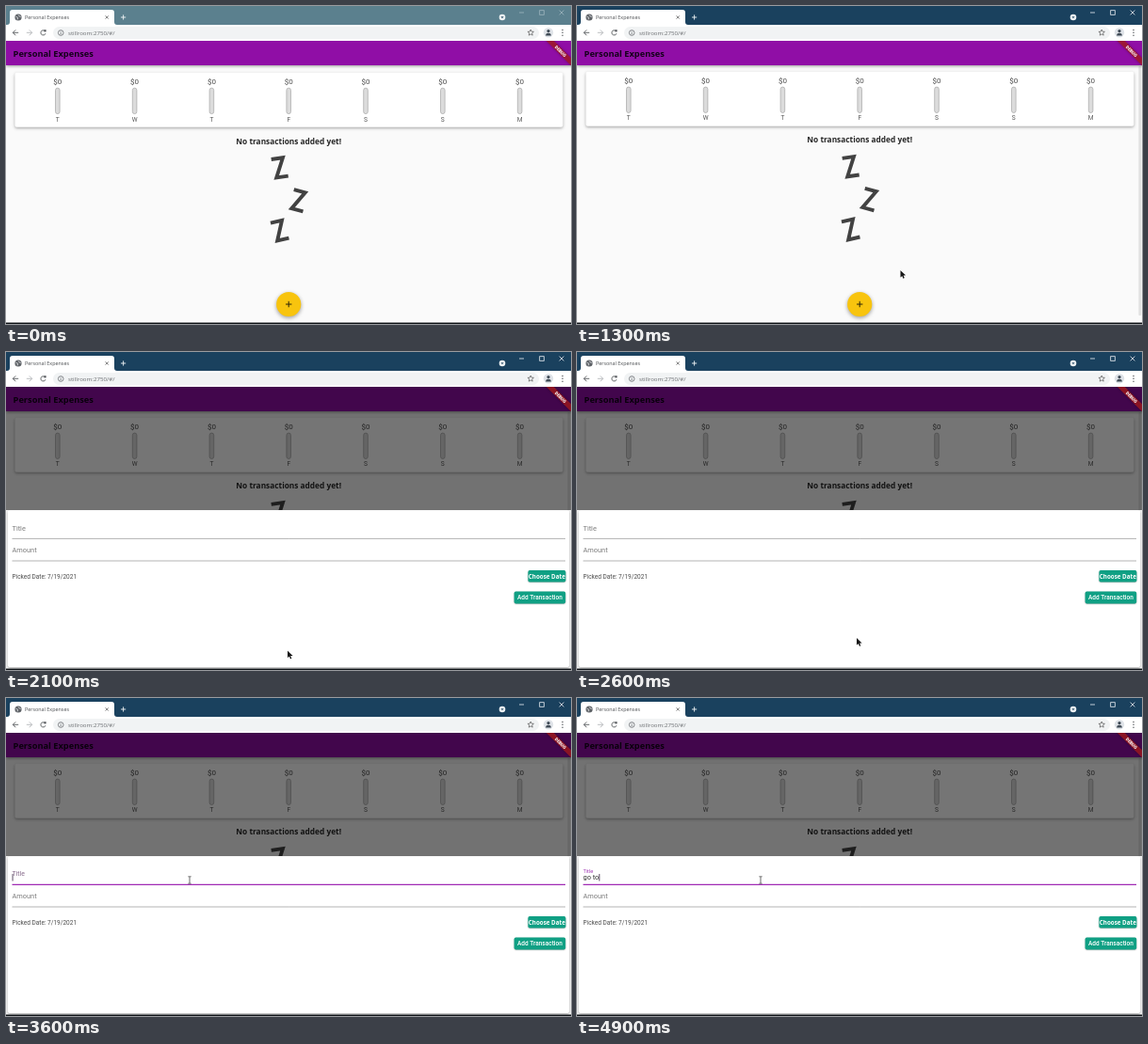
An HTML page with a canvas that plays this animation: 600 px wide and 338 px high, repeating every 5000 ms.

```html
<!DOCTYPE html>
<html lang="en">
<head>
<meta charset="utf-8">
<title>Personal Expenses</title>
<style>
html, body { margin: 0; width: 100%; height: 100%; overflow: hidden; background: #fafafa; }
canvas { display: block; width: 600px; height: 338px; }
</style>
</head>
<body>
<canvas id="stage"></canvas>
<script>
const W = 600, H = 338, LOOP = 5000, STEP = 100;
const OPEN = '"Open Sans", "Noto Sans", sans-serif';
const ROBOTO = 'Roboto, Arial, sans-serif';
const PURPLE = '#900ea6', TEAL = '#10a084';

const canvas = document.getElementById('stage');
const c = canvas.getContext('2d');
const dpr = window.devicePixelRatio || 1;
canvas.width = W * dpr;
canvas.height = H * dpr;

const clamp = v => Math.max(0, Math.min(1, v));
const ramp = (t, a, b) => clamp((t - a) / (b - a));
const ease = k => k * k * (3 - 2 * k);
const mix = (a, b, k) => a + (b - a) * k;
const mixColor = (a, b, k) => `rgb(${a.map((v, i) => Math.round(mix(v, b[i], k))).join()})`;

// time, x, y of the pointer
const PATH = [
  [100, 452, 282], [600, 385.5, 226], [1200, 347, 278], [1800, 299.5, 317],
  [2100, 299, 317.5], [2600, 297, 304], [3100, 202, 197.5], [3500, 195, 193.5]
];

function pointerAt(t) {
  const i = PATH.findIndex(p => p[0] > t);
  if (i < 0) return PATH[PATH.length - 1].slice(1);
  if (i === 0) return null;
  const [t0, x0, y0] = PATH[i - 1], [t1, x1, y1] = PATH[i];
  const k = ease(ramp(t, t0, t1));
  return [mix(x0, x1, k), mix(y0, y1, k)];
}

function rect(x, y, w, h, fill, r = 0) {
  c.beginPath();
  c.roundRect(x, y, w, h, r);
  c.fillStyle = fill;
  c.fill();
}

function disc(x, y, r, fill) {
  c.beginPath();
  c.arc(x, y, r, 0, Math.PI * 2);
  c.fillStyle = fill;
  c.fill();
}

function ring(x, y, r, color, width, a = 0, b = Math.PI * 2) {
  c.beginPath();
  c.arc(x, y, r, a, b);
  c.strokeStyle = color;
  c.lineWidth = width;
  c.stroke();
}

function line(points, color, width) {
  c.beginPath();
  for (let i = 0; i < points.length; i += 2) c.lineTo(points[i], points[i + 1]);
  c.strokeStyle = color;
  c.lineWidth = width;
  c.stroke();
}

function cross(x, y, r, color, width) {
  line([x - r, y - r, x + r, y + r], color, width);
  line([x - r, y + r, x + r, y - r], color, width);
}

function plus(x, y, r, color, width) {
  line([x - r, y, x + r, y], color, width);
  line([x, y - r, x, y + r], color, width);
}

// y is the middle of the capitals
function text(s, x, y, size, color, family = ROBOTO, weight = 400, align = 'left') {
  c.font = `${weight} ${size}px ${family}`;
  c.fillStyle = color;
  c.textAlign = align;
  c.fillText(s, x, y + size * 0.357);
}

function withShadow(color, blur, dy, draw) {
  c.save();
  c.shadowColor = color;
  c.shadowBlur = blur * dpr;
  c.shadowOffsetY = dy * dpr;
  draw();
  c.restore();
}

function windowBar(t) {
  const k = ramp(t, 0, 200);
  const control = mixColor([158, 181, 190], [235, 240, 244], k);
  rect(0, 0, W, 20, mixColor([91, 128, 142], [26, 65, 94], k));

  c.beginPath();
  c.moveTo(1, 20);
  c.quadraticCurveTo(4, 20, 4, 17);
  c.lineTo(4, 7);
  c.quadraticCurveTo(4, 4, 7, 4);
  c.lineTo(112, 4);
  c.quadraticCurveTo(115, 4, 115, 7);
  c.lineTo(115, 17);
  c.quadraticCurveTo(115, 20, 118, 20);
  c.fillStyle = '#fff';
  c.fill();

  disc(13, 12, 3.6, '#5f6368');
  line([10.5, 11.2, 12.6, 12.4, 12, 14.4], '#e4e6e8', 0.9);
  line([13.2, 9.6, 14.2, 11, 15.7, 11.4], '#e4e6e8', 0.9);
  text('Personal Expenses', 20, 12.1, 5.4, '#4a4d50', OPEN);
  cross(107.2, 12, 1.6, '#555', 0.8);
  plus(124.6, 12, 2.6, '#f2f5f7', 0.9);

  disc(527, 12, 3.3, '#eef2f4');
  c.beginPath();
  c.moveTo(525.4, 11.3);
  c.lineTo(528.6, 11.3);
  c.lineTo(527, 13.2);
  c.fillStyle = '#34566f';
  c.fill();
  line([545, 7, 550, 7], control, 0.8);
  c.strokeStyle = control;
  c.lineWidth = 0.8;
  c.strokeRect(566.7, 4.7, 4.6, 4.6);
  cross(590, 7, 2.4, control, 0.8);
}

function star(x, y, r) {
  c.beginPath();
  for (let i = 0; i < 10; i++) {
    const a = i * Math.PI / 5 - Math.PI / 2, d = i % 2 ? r * 0.45 : r;
    c.lineTo(x + d * Math.cos(a), y + d * Math.sin(a));
  }
  c.closePath();
  c.strokeStyle = '#555';
  c.lineWidth = 0.7;
  c.stroke();
}

function toolbar() {
  const ink = '#55585c';
  rect(0, 20, W, 17, '#fff');
  line([13.2, 28.3, 7.3, 28.3], ink, 0.9);
  line([10.2, 25.4, 7.3, 28.3, 10.2, 31.2], ink, 0.9);
  line([21.8, 28.3, 27.7, 28.3], '#b5b7ba', 0.9);
  line([24.8, 25.4, 27.7, 28.3, 24.8, 31.2], '#b5b7ba', 0.9);
  ring(39.5, 28.4, 2.6, ink, 0.9, 0.3, 5.5);
  rect(40.4, 25.2, 2.2, 2.2, ink);

  rect(50, 22, 516, 13, '#f1f3f4', 6.5);
  ring(58.2, 28.5, 2.8, ink, 0.7);
  line([58.2, 28.2, 58.2, 30.2], ink, 0.7);
  line([58.2, 26.8, 58.2, 27.5], ink, 0.7);
  text('stillroom:2750/#/', 66, 28.5, 6.15, '#6a6d70', OPEN);
  star(557.2, 28.4, 3.4);

  disc(576, 28.3, 5.2, '#dfe3e8');
  disc(576, 26.6, 1.6, '#3f4a55');
  c.beginPath();
  c.arc(576, 31.6, 2.9, Math.PI, 0);
  c.fillStyle = '#3f4a55';
  c.fill();
  for (const y of [25.4, 28.3, 31.2]) disc(591, y, 0.75, ink);
}

function zed(x, y, degrees) {
  c.save();
  c.translate(x, y);
  c.rotate(degrees * Math.PI / 180);
  line([-7.6, -10, 4.8, -10, -4.8, 10, 7.8, 10], '#424242', 3.9);
  c.restore();
}

function page(t) {
  rect(0, 37, W, 300, '#fafafa');

  c.save();
  c.translate(0, -0.5 * ramp(t, 100, 600) - 0.6 * ramp(t, 700, 1200));
  withShadow('rgba(0,0,0,.34)', 3.2, 1.2, () => rect(9.4, 70.8, 582, 58, '#fff', 2));
  'TWTFSSM'.split('').forEach((day, i) => {
    const x = 300.2 + (i - 3) * 81.8;
    text('$0', x, 80.4, 8, '#4a4a4a', ROBOTO, 400, 'center');
    rect(x - 2.3, 87.2, 4.6, 27.4, '#dcdcdc', 2.3);
    c.strokeStyle = '#a6a6a6';
    c.lineWidth = 0.7;
    c.stroke();
    text(day, x, 120.2, 6.6, '#555', ROBOTO, 400, 'center');
  });
  text('No transactions added yet!', 300.2, 143.6, 8.32, '#262626', OPEN, 700, 'center');
  zed(290.6, 171.8, -8);
  zed(310.5, 206.7, 15);
  zed(290.6, 238.6, -13);
  c.restore();

  withShadow('rgba(0,0,0,.4)', 3, 1, () => rect(0, 37, W, 26, PURPLE));
  text('Personal Expenses', 7.6, 50.4, 9.25, '#14021a', OPEN, 700);
  const bar = ramp(t, 900, 1300);
  if (bar) rect(596.4, 64, 2.8, 265, `rgba(0,0,0,${0.1 * bar})`, 1);

  const fill = t >= 1900 ? '#d9b634' : t >= 1600 ? '#ecbd20' : '#f8c40e';
  withShadow('rgba(0,0,0,.38)', t >= 1900 ? 6 : 4, 1.6, () => disc(300.2, 317, 13.1, fill));
  plus(300.2, 317, 3.2, '#2a2408', 1);
}

function button(label, x, y, w, h, size, family, weight) {
  withShadow('rgba(0,0,0,.3)', 1.5, 0.6, () => rect(x, y, w, h, TEAL, 1.8));
  text(label, x + w / 2, y + h / 2 + 0.1, size, '#fff', family, weight, 'center');
}

function sheet(t) {
  rect(0, 37, W, 300, 'rgba(0,0,0,.54)');
  rect(0, 168, W, 169, '#f4f4f4');
  withShadow('rgba(0,0,0,.35)', 2, 0.7, () => rect(1.8, 168.3, 596.4, 166.7, '#fff', 2));

  const focused = t >= 3600;
  const k = ease(ramp(t, 3500, 3800));
  text('Title', 6.5, mix(187, 183.9, k), mix(7.4, 5.5, k),
    mixColor([125, 125, 125], [158, 52, 178], k));
  line([6.5, 198.4, 594, 198.4], focused ? '#a02bb4' : '#929292', focused ? 1.2 : 0.7);
  text('Amount', 6.5, 210.5, 7.4, '#7d7d7d');
  line([6.5, 222, 594, 222], '#929292', 0.7);
  text('Picked Date: 7/19/2021', 6.5, 238.5, 6.5, '#4c4c4c');
  button('Choose Date', 554.4, 232.1, 40, 12.4, 6.25, OPEN, 700);
  button('Add Transaction', 539.6, 254.6, 54.6, 12.8, 6.5, ROBOTO, 500);

  const count = t < 4600 ? 0 : [1, 2, 4, 5][Math.min(3, (t - 4600) / STEP | 0)];
  const typed = 'go to'.slice(0, count);
  text(typed, 6.5, 190.6, 7.4, '#333');
  if (focused && (t < 4100 || t >= 4600)) {
    rect(6.6 + c.measureText(typed).width, 187, 0.9, 7.6, '#4b3a55');
  }
}

function ribbon() {
  c.save();
  c.beginPath();
  c.rect(0, 37, W, 300);
  c.clip();
  c.translate(W, 37);
  c.rotate(Math.PI / 4);
  withShadow('rgba(0,0,0,.5)', 2.6, 0, () => rect(-20, 12.9, 40, 5.6, 'rgba(183,28,28,.68)'));
  text('DEBUG', 0, 15.7, 4.6, '#fff', ROBOTO, 900, 'center');
  c.restore();
}

function shape(points, x, y) {
  c.beginPath();
  for (let i = 0; i < points.length; i += 2) c.lineTo(x + points[i], y + points[i + 1]);
  c.closePath();
  c.lineJoin = 'round';
  c.strokeStyle = 'rgba(255,255,255,.85)';
  c.lineWidth = 1;
  c.stroke();
  c.lineJoin = 'miter';
  c.fillStyle = '#181818';
  c.fill();
}

function pointer(t) {
  const at = pointerAt(t);
  if (!at) return;
  const [x, y] = at;
  const overButton = t < 2100 && Math.hypot(x - 300.2, y - 317) < 13;
  const overField = t >= 2100 && y > 178 && y < 222;
  if (overField) {
    line([x, y - 3.6, x, y + 3.6], '#444', 0.8);
    for (const d of [-3.7, 3.7]) line([x - 1.7, y + d, x + 1.7, y + d], '#444', 0.7);
  } else if (overButton) {
    shape([-0.8, 0, 0.8, 0, 0.9, 3.4, 4.4, 4.3, 4.8, 6, 3.9, 9.4,
      -0.4, 9.4, -2.9, 5.9, -2.2, 5, -0.8, 6], x, y);
  } else {
    shape([0, 0, 0, 7.6, 1.8, 6, 3, 8.8, 4.3, 8.2, 3.1, 5.6, 5.6, 5.4], x, y);
  }
}

function draw(now) {
  const t = Math.floor(now % LOOP / STEP) * STEP;
  c.setTransform(dpr, 0, 0, dpr, 0, 0);
  page(t);
  if (t >= 2100) sheet(t);
  ribbon();
  windowBar(t);
  toolbar();
  rect(0, 336.6, W, 1.4, '#101418');
  pointer(t);
}

let start;
function tick(now) {
  start ??= now;
  draw(now - start);
  requestAnimationFrame(tick);
}
draw(0);
requestAnimationFrame(tick);
</script>
</body>
</html>
```
